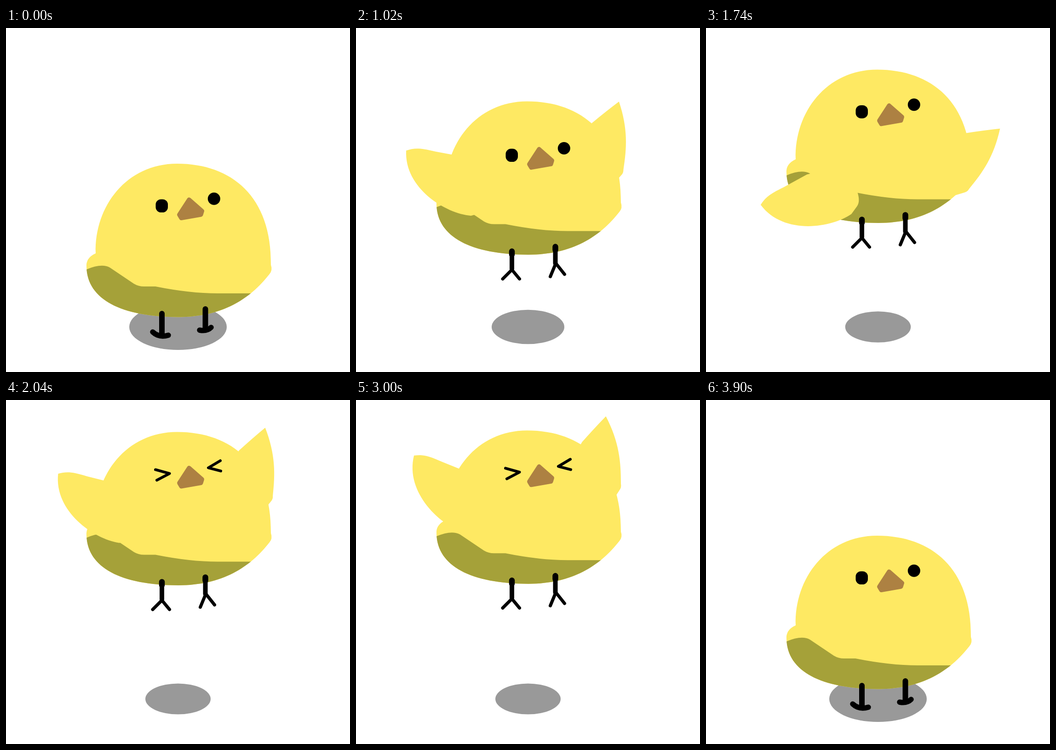
An HTML page with a canvas that plays this animation: 748 px wide and 748 px high, repeating every 4500 ms.

```html
<!DOCTYPE html>
<html lang="en">
<head>
<meta charset="utf-8">
<title>Flying chick</title>
<style>
html, body { margin: 0; width: 100%; height: 100%; overflow: hidden; background: #fff; }
canvas { display: block; width: 748px; height: 748px; }
</style>
</head>
<body>
<canvas id="stage" width="748" height="748"></canvas>
<script>
const ctx = document.getElementById('stage').getContext('2d');
const LOOP = 4500, STEP = 60, TAKEOFF = 300, FALL = 3000, LANDED = 3900;
const LOW_HOVER = 129.7, HIGH_HOVER = 218.5;
const BLACK = '#000', YELLOW = '#fee963', SHADE = '#a5a139', BEAK = '#ad8142', GREY = '#999', BLUE = '#7ab1e0';

const body = new Path2D(`M195 490 C192 388 262 295 372 295 C491 295 578 367 576 515
  Q580 527 573 535 C530 590 470 628 375 628.5 C250 628 177 590 175 520 Q173 500 195 490Z`);
const belly = new Path2D(`M160 529 L175 525 Q208 511 226 521 L278 556 Q288 562 300 562
  L325 562 Q400 577 460 577 H540 V660 H160Z`);
const leftWing = new Path2D(`M99 470 C115 460 125 457 160 456.5 L218 453 L262 462 Q300 490 301 536
  Q298 556 287 562 L269 572 C215 581 115 550 99 470Z`);
const rightWing = new Path2D(`M603 338 Q572 353 537 372 L480 420 L500 480 L545 500 L561 507 L577 495
  Q583 491 584 484 C600 440 611 400 603 338Z`);

const progress = (t, from, to) => Math.min(1, Math.max(0, (t - from) / (to - from)));
const ease = (t, from, to) => {
  const u = progress(t, from, to);
  return u * u * (3 - 2 * u);
};
const radians = degrees => degrees * Math.PI / 180;

// Two climbs, then an accelerating fall.
function heightAt(t) {
  const climbed = LOW_HOVER * ease(t, 240, 780) + (HIGH_HOVER - LOW_HOVER) * ease(t, 1320, 1800);
  return climbed * (1 - progress(t, FALL, LANDED) ** 2);
}

// Wing angle: a quickening beat, a glide with raised wings, then a landing stroke.
function flapAt(t) {
  const s = Math.min(t, 3060) - 1020;
  const beat = 4 + 27 * Math.sin(radians(29.5 + 0.34 * s + 0.000021 * s * s));
  const landing = ease(t, 3480, 3840);
  return beat * (1 - landing) - 24 * landing;
}

function fill(path, color) {
  ctx.fillStyle = color;
  ctx.fill(path);
}

function ellipse(x, y, rx, ry, color) {
  const path = new Path2D();
  path.ellipse(x, y, rx, ry, 0, 0, Math.PI * 2);
  fill(path, color);
}

function stroke(d, width, color = BLACK) {
  ctx.strokeStyle = color;
  ctx.lineWidth = width;
  ctx.stroke(new Path2D(d));
}

function drawBody() {
  fill(body, YELLOW);
  ctx.save();
  ctx.clip(body);
  fill(belly, SHADE);
  ctx.restore();
}

function drawWing(path, degrees, stretch) {
  ctx.save();
  ctx.translate(376, 485);
  ctx.rotate(radians(degrees));
  ctx.scale(stretch, stretch);
  ctx.translate(-376, -485);
  fill(path, YELLOW);
  ctx.restore();
}

function drawLegs(flying) {
  if (flying) {
    stroke('M339 621v7 M433.5 611v7', 12.5);
    stroke('M339 621v38 M433.5 611v36', 10);
    stroke('M319 681l20 -20l16.5 20 M422.5 676l12 -29l19 24', 7);
  } else {
    stroke('M339 621v47 M433.5 611v45', 12);
    stroke('M319 661Q333 674 353 668 M421 657Q437 660 446 651', 11.5);
  }
}

function drawFace(squinting) {
  if (squinting) {
    stroke('M325 377l30.5 8.5l-27.5 14.5 M466 357.5l-26 15.5l27 7', 6);
  } else {
    const eye = new Path2D();
    eye.roundRect(325.5, 372.5, 26.5, 28.5, 11.5);
    fill(eye, BLACK);
    ellipse(452.3, 371.3, 13.5, 13.5, BLACK);
  }
  const beak = 'M398 373L426.5 398L424 406L381 413.5L376.5 406Z';
  fill(new Path2D(beak), BEAK);
  stroke(beak, 9, BEAK);
}

function drawSpark(x, y, degrees, length) {
  ctx.save();
  ctx.translate(x, y);
  ctx.rotate(radians(degrees));
  fill(new Path2D(`M0 -0.5L${length} -4L${length + 2} 3L${length} 4L0 0.5Z`), BLUE);
  ctx.restore();
}

function draw(t) {
  const flying = t >= TAKEOFF && t < LANDED;
  const height = flying ? heightAt(t) : 0;
  const swing = flapAt(t) - 3.1;
  const bob = 0.4 * swing * Math.min(1, height / LOW_HOVER);
  const radius = 106 - 35 * Math.sqrt(height / HIGH_HOVER);

  ctx.fillStyle = '#fff';
  ctx.fillRect(0, 0, 748, 748);
  ctx.lineCap = ctx.lineJoin = 'round';
  ellipse(374, 650, radius, radius * 0.4725, GREY);

  ctx.save();
  ctx.translate(0, -height - bob);
  drawBody();
  if (flying) {
    const stretch = 1 + Math.max(0, swing) ** 2 / 26000;
    drawWing(leftWing, swing, stretch);
    drawWing(rightWing, -0.785 * swing, stretch);
  }
  drawLegs(flying);
  ctx.translate(0, 25.5 * Math.sin(Math.PI * progress(t, 720, 1320)));
  drawFace(t >= 1800 && t < 3480);
  ctx.restore();

  if (t >= 2280 && t < 2820) {
    drawSpark(500, 63, -87, 35);
    drawSpark(530, 97.5, -38, 40);
    drawSpark(576, 112, -22, 38);
  }
}

function tick() {
  const t = performance.now() % LOOP;
  draw(Math.floor(t / STEP) * STEP);
  requestAnimationFrame(tick);
}
tick();
</script>
</body>
</html>
```
